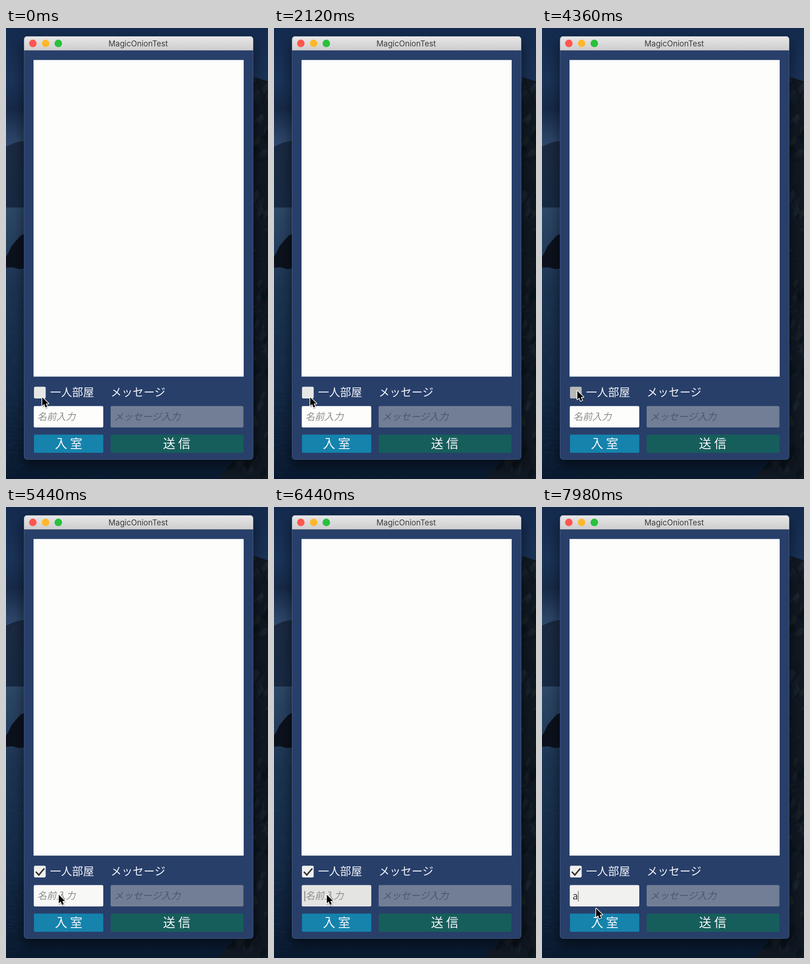
Recreate the animation shown at these times as an HTML page. Size 571 by 980 pixels, loop 8000 ms.

```html
<!DOCTYPE html>
<html lang="ja">
<head>
<meta charset="utf-8">
<style>
  html, body { margin: 0; width: 100%; height: 100%; overflow: hidden; background: #10223f; }
  svg { display: block; width: 100%; height: 100%; }
  text { font-family: "Noto Sans CJK JP", "Noto Sans CJK", sans-serif; fill: #f4f6fa; }
  .label { font-size: 24px; }
  .hint { font-size: 20.8px; font-style: italic; }
  .button { font-size: 27px; text-anchor: middle; }
</style>
</head>
<body>
<svg viewBox="0 0 571 980">
  <defs>
    <linearGradient id="sky" x2="0" y2="1">
      <stop offset="0" stop-color="#142b4f"/>
      <stop offset=".3" stop-color="#1a3358"/>
      <stop offset=".45" stop-color="#172a49"/>
      <stop offset=".62" stop-color="#2c4669"/>
      <stop offset="1" stop-color="#3a5375"/>
    </linearGradient>
    <linearGradient id="hill" x2="0" y2="1">
      <stop offset="0" stop-color="#1b2a42"/>
      <stop offset="1" stop-color="#172a43"/>
    </linearGradient>
    <linearGradient id="sea" x2="0" y2="1">
      <stop offset="0" stop-color="#2d4868"/>
      <stop offset=".3" stop-color="#1c3452"/>
      <stop offset=".65" stop-color="#142a47"/>
      <stop offset="1" stop-color="#091a30"/>
    </linearGradient>
    <linearGradient id="bar" x2="0" y2="1">
      <stop offset="0" stop-color="#e8e7e8"/>
      <stop offset="1" stop-color="#cecdce"/>
    </linearGradient>
    <filter id="shadow" x="-20%" y="-20%" width="140%" height="140%">
      <feGaussianBlur stdDeviation="14"/>
    </filter>
    <filter id="soft"><feGaussianBlur stdDeviation="1"/></filter>
    <clipPath id="land">
      <path id="cliff" d="M525 106 L546 108 571 116 V980 H462 L480 958 500 938 520 915 532 880 525 780Z"/>
    </clipPath>
    <clipPath id="frame"><rect x="39" y="18" width="500" height="920" rx="7"/></clipPath>
  </defs>

  <rect width="571" height="392" fill="url(#sky)"/>
  <path d="M0 258 L15 251 28 247 45 245 V394 H0Z" fill="url(#hill)"/>
  <rect y="390" width="571" height="590" fill="url(#sea)"/>
  <g id="waves" stroke="#35506f" opacity=".22"/>
  <path d="M0 497 L6 487 12 474 22 462 31 452 42 446 V522 L29 524 14 520 0 521Z" fill="#0c121d"/>
  <use href="#cliff" fill="#111923"/>
  <g id="rocks" clip-path="url(#land)" filter="url(#soft)"/>

  <rect x="37" y="30" width="504" height="922" rx="8" fill="#000" opacity=".5" filter="url(#shadow)"/>
  <g clip-path="url(#frame)">
    <rect x="39" y="18" width="500" height="920" fill="#283f6a"/>
    <rect x="39" y="18" width="500" height="30.5" fill="url(#bar)"/>
    <path d="M39 18.5H539" stroke="#f6f6f6"/>
    <path d="M39 48.5H539" stroke="#8f959f"/>
  </g>
  <rect x="39.5" y="18.5" width="499" height="919" rx="6.5" fill="none" stroke="#6d7f9f" opacity=".45"/>
  <circle cx="58.5" cy="33.5" r="8.2" fill="#ff564f"/>
  <circle cx="86.3" cy="33.5" r="8.2" fill="#ffb82b"/>
  <circle cx="114" cy="33.5" r="8.2" fill="#27c13b"/>
  <text x="288" y="40" text-anchor="middle" style="font:17px Inter,sans-serif;fill:#3b3b3b">MagicOnionTest</text>

  <rect x="60" y="69.5" width="458" height="688" fill="#fdfdfc"/>

  <rect id="toggle" x="61" y="779.5" width="25.5" height="25.5" rx="3"/>
  <path id="check" d="M65 792.5 L71.5 799.5 83.5 785.5" fill="none" stroke="#343434" stroke-width="3.2"/>
  <text class="label" x="96" y="800">一人部屋</text>
  <text class="label" x="228" y="800">メッセージ</text>

  <rect id="field" x="60.5" y="821.5" width="151.5" height="46.5" rx="3"/>
  <text id="hint" class="hint" x="68" y="852" style="fill:#8d8d8d">名前入力</text>
  <text id="typed" x="66.5" y="853" style="font-size:21px;fill:#333">a</text>
  <rect id="caret" y="834.5" width="1.2" height="22.5" fill="#4a4a4a"/>
  <rect x="228" y="821.5" width="289.5" height="46.5" rx="3" fill="#727e95"/>
  <text class="hint" x="235" y="852" style="fill:#4d576a">メッセージ入力</text>

  <rect x="61" y="883.5" width="151" height="39.5" rx="2.5" fill="#1583ac"/>
  <rect x="228" y="883.5" width="289.5" height="39.5" rx="2.5" fill="#165e5b"/>
  <text class="button" x="136.5" y="912.5">入 室</text>
  <text class="button" x="372" y="912.5">送 信</text>

  <g id="cursor" stroke-linejoin="round">
    <path id="arrow" d="M0 0 V18.6 L4.2 14.8 7.2 22 10.8 20.4 7.8 13.5 H13.5Z" transform="translate(.5 2)"
      fill="#000" stroke="#000" stroke-width="3" opacity=".25" filter="url(#soft)"/>
    <path d="M0 0 V18.6 L4.2 14.8 7.2 22 10.8 20.4 7.8 13.5 H13.5Z" fill="#000" stroke="#fff" stroke-width="3" paint-order="stroke"/>
  </g>
</svg>
<script>
const LOOP = 8000;
const $ = id => document.getElementById(id);

// Keys are [time, value]; values ease between neighbouring keys.
const pointerX = [[3340, 79], [3700, 77], [4680, 77], [5250, 115], [7600, 115], [7900, 118]];
const pointerY = [[3240, 801], [3340, 798], [3700, 787], [4680, 787], [5250, 841], [7600, 841], [7900, 871]];
const toggleGray = [[4240, 231], [4340, 184], [4440, 184], [4540, 235], [5100, 235], [5200, 240]];
const fieldGray = [[5000, 253], [5100, 248], [6280, 248], [6360, 205], [6400, 205], [6460, 235], [6560, 241]];
const CHECK_AT = 4440, FOCUS_AT = 6400, TYPE_AT = 7560, BLINK = 588;

function track(keys, t) {
  const i = keys.findIndex(k => k[0] > t);
  if (i < 0) return keys.at(-1)[1];
  if (i === 0) return keys[0][1];
  const [t0, a] = keys[i - 1], [t1, b] = keys[i];
  const p = (t - t0) / (t1 - t0);
  return a + (b - a) * p * p * (3 - 2 * p);
}

let seed = 7;
const random = () => (seed = seed * 16807 % 2147483647) / 2147483647;
const between = (a, b) => a + (b - a) * random();

function add(parent, tag, attributes) {
  const node = document.createElementNS(parent.namespaceURI, tag);
  for (const name in attributes) node.setAttribute(name, attributes[name]);
  parent.append(node);
}

for (let i = 0; i < 180; i++) {
  const x = between(-10, 36), y = between(394, 975);
  add($('waves'), 'path', { d: `M${x} ${y}h${between(4, 14)}` });
}
const rockTones = ['#080d15', '#0c131d', '#182230', '#202a35', '#1b252c'];
for (let i = 0; i < 230; i++) {
  const x = between(480, 571), y = between(115, 980), w = between(4, 13), h = between(5, 20);
  add($('rocks'), 'path', {
    d: `M${x} ${y}l${w} ${-h}l${w * .5} ${h * .7}l${-w} ${h}z`,
    fill: rockTones[i % rockTones.length], opacity: .55
  });
}

const gray = v => `rgb(${v},${v},${v - 1})`;
const show = (id, visible) => $(id).setAttribute('visibility', visible ? 'visible' : 'hidden');

function draw(now) {
  const t = now % LOOP, typed = t >= TYPE_AT;
  $('cursor').setAttribute('transform', `translate(${track(pointerX, t)} ${track(pointerY, t) + 1.5})`);
  $('toggle').setAttribute('fill', gray(track(toggleGray, t)));
  $('field').setAttribute('fill', gray(track(fieldGray, t)));
  show('check', t >= CHECK_AT);
  show('hint', !typed);
  show('typed', typed);
  const sinceBlink = t - (typed ? TYPE_AT : FOCUS_AT);
  show('caret', sinceBlink >= 0 && sinceBlink % (2 * BLINK) < BLINK);
  $('caret').setAttribute('x', typed ? 78.5 : 66.5);
  requestAnimationFrame(draw);
}
requestAnimationFrame(draw);
</script>
</body>
</html>
```
